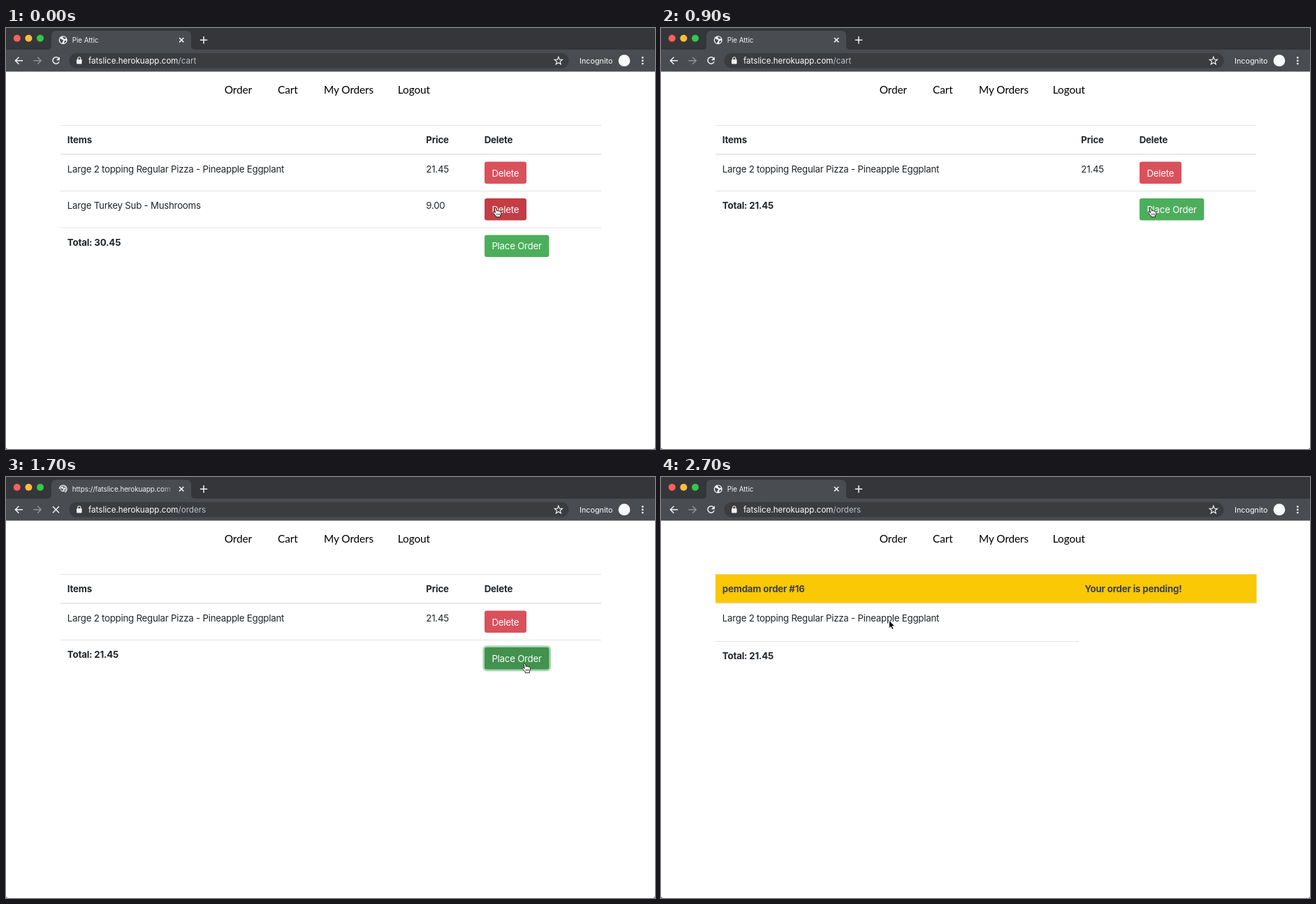
These frames come from a looping animation (929x603 px, 2.8 s). An HTML page:

```html
<!DOCTYPE html>
<html lang="en">
<head>
<meta charset="utf-8">
<title>Cart checkout</title>
<style>
  html, body { margin: 0; width: 100%; height: 100%; overflow: hidden; background: #fff; }
  svg { display: block; width: 929px; height: 603px; }
  text { font-family: Inter, Roboto, sans-serif; white-space: pre; }
  .page text { font-size: 13.27px; letter-spacing: -.018em; fill: #212529; }
  .page .bold { font-weight: 700; letter-spacing: -.013em; }
  .page .label { fill: #fff; }
  .page .banner { fill: #3f4045; }
  .nav text { font: 15.4px Lato, "Open Sans", sans-serif; letter-spacing: -.1px; fill: #000; }
  .title { font-size: 9.95px; letter-spacing: -.01em; fill: #f1f3f4; }
  .url { font-size: 11.6px; fill: #fff; }
  .path { fill: #bdc1c6; }
  .rule { stroke: #e0e3e6; stroke-width: 1; }
  .icon { fill: none; stroke: #f1f3f4; stroke-width: 1.5; }
  .hidden { display: none; }
</style>
</head>
<body>
<svg viewBox="0 0 929 603">
  <defs>
    <linearGradient id="fade">
      <stop offset="0" stop-color="#494c50" stop-opacity="0"/>
      <stop offset="1" stop-color="#494c50"/>
    </linearGradient>
    <g id="globe">
      <circle r="6" fill="#f1f3f4"/>
      <path d="M-4.7-1.8C-3-2.2-2.6-.6-.9-.5C.5-.3.8 1-.3 1.7C-1.3 2.4-.8 3.8-1.8 4.6C-3.7 3.8-4.9 1.6-4.7-1.8Z
               M-.6-4.7C1.5-5.2 3.6-4 4.4-2.2C3.3-1.3 2.4-2.2 1.6-1.4C.4-1.7 1.2-2.8.1-3.2Z
               M2.2 1.2C3.2.6 4.2.9 4.7 1.3C4.2 2.9 3.2 4 1.9 4.5C1.5 3.3 1.5 2 2.2 1.2Z" fill="#494c50"/>
    </g>
  </defs>

  <rect width="929" height="603" fill="#fff"/>

  <!-- Browser frame -->
  <rect width="929" height="32" fill="#35363a"/>
  <rect y="31" width="929" height="31.5" fill="#494c50"/>
  <path d="M58 31.5Q65 31.5 65 24.5V11Q65 4 72 4H258Q265 4 265 11V24.5Q265 31.5 272 31.5Z" fill="#494c50"/>
  <circle cx="15.8" cy="14.8" r="5" fill="#fc605c"/>
  <circle cx="32.4" cy="14.8" r="5" fill="#fdbc40"/>
  <circle cx="49" cy="14.8" r="5" fill="#34c749"/>
  <g id="idleIcon"><use href="#globe" x="81.7" y="17.2"/></g>
  <g id="busyIcon" transform="translate(81.7 17.2)">
    <use href="#globe" transform="scale(.62)"/>
    <path id="spinner" d="M0-5.3A5.3 5.3 0 1 1-4.6 2.65" fill="none" stroke="#e8eaed" stroke-width="1.4"/>
  </g>
  <text id="title" class="title" x="94.7" y="20.8"></text>
  <rect x="224" y="10" width="17" height="14" fill="url(#fade)"/>
  <path class="icon" d="M248 14l6.4 6.4M254.4 14l-6.4 6.4M283 12v10.4M277.8 17.2h10.4"/>

  <path class="icon" d="M24 46.7H13.6M18.4 41.7L13.4 46.7L18.4 51.7"/>
  <path class="icon" style="stroke:#8f9296" d="M39.5 46.7H50M45.2 41.7L50.2 46.7L45.2 51.7"/>
  <g id="reload">
    <path class="icon" d="M75.3 43.4A4.7 4.7 0 1 0 76 48.3"/>
    <path d="M76.9 41.2V46.2H71.9Z" fill="#f1f3f4"/>
  </g>
  <path id="stop" class="icon" d="M67 42.3l9 9M76 42.3l-9 9"/>
  <rect x="90.5" y="36" width="715" height="21.6" rx="10.8" fill="#3a3c40"/>
  <rect x="101" y="45" width="7.6" height="6.4" rx=".8" fill="#f1f3f4"/>
  <path d="M102.7 45.5V43.8A2.1 2.1 0 0 1 106.9 43.8V45.5" class="icon" style="stroke-width:1.1"/>
  <text class="url" x="118" y="50.7">fatslice.herokuapp.com<tspan id="path" class="path"></tspan></text>
  <path id="star" class="icon" style="stroke-width:1.1"/>
  <text class="url" style="font-size:10.8px" x="821" y="50.7">Incognito</text>
  <circle cx="885" cy="46.7" r="8.4" fill="#f8f9fa"/>
  <g fill="#f1f3f4">
    <circle cx="911.3" cy="42.5" r="1.4"/><circle cx="911.3" cy="46.8" r="1.4"/><circle cx="911.3" cy="51.1" r="1.4"/>
  </g>

  <g class="nav">
    <text x="312.8" y="94.4">Order</text>
    <text x="389" y="94.4">Cart</text>
    <text x="455" y="94.4">My Orders</text>
    <text x="560.8" y="94.4">Logout</text>
  </g>

  <!-- Cart -->
  <g id="cart" class="page">
    <path class="rule" d="M78 139.5H852M78 233.5H852"/>
    <path class="rule" style="stroke-width:1.6" d="M78 180.7H852"/>
    <text class="bold" x="87.8" y="164.8">Items</text>
    <text class="bold" x="601.3" y="164.8">Price</text>
    <text class="bold" x="684.7" y="164.8">Delete</text>
    <text x="87.8" y="206.7">Large 2 topping Regular Pizza - Pineapple Eggplant</text>
    <text x="601.3" y="206.7">21.45</text>
    <rect x="685" y="191.6" width="60" height="31.5" rx="3.3" fill="#d9515b"/>
    <text class="label" x="695.4" y="212.6">Delete</text>
    <g id="sub">
      <path class="rule" d="M78 286H852"/>
      <text x="87.8" y="259.2">Large Turkey Sub - Mushrooms</text>
      <text x="601.3" y="259.2">9.00</text>
      <rect id="redRing" x="682.4" y="241.5" width="65.2" height="36.7" rx="5.6" fill="#edaab0"/>
      <rect x="685" y="244.1" width="60" height="31.5" rx="3.3" fill="#c43c44"/>
      <text class="label" x="695.4" y="265">Delete</text>
    </g>
    <g id="foot">
      <text id="total" class="bold" x="87.8" y="259.2"></text>
      <rect id="greenRing" x="682.4" y="241.5" width="97.6" height="36.7" rx="5.6" fill="#a6d8b0"/>
      <rect id="place" x="685" y="244.1" width="92.4" height="31.5" rx="3.3"/>
      <text class="label" x="695.4" y="265">Place Order</text>
    </g>
  </g>

  <!-- Orders -->
  <g id="orders" class="page">
    <rect x="78" y="139" width="774.5" height="42" fill="#fac805"/>
    <path d="M78 139.5H852.5" stroke="#ead58a"/>
    <path d="M78 180.5H852.5" stroke="#e6d596" stroke-width="1.4"/>
    <path class="rule" d="M78 235.5H598"/>
    <text class="bold banner" x="87.8" y="164.8">pemdam order #16</text>
    <text class="bold banner" x="606.4" y="164.8">Your order is pending!</text>
    <text x="87.8" y="206.7">Large 2 topping Regular Pizza - Pineapple Eggplant</text>
    <text class="bold" x="87.8" y="260.8">Total: 21.45</text>
  </g>

  <path d="M0 600Q0 603 3 603H0ZM929 600Q929 603 926 603H929Z" fill="#55585c"/>

  <!-- Pointers, with the hot spot at 0,0 -->
  <g id="hand" stroke="#222" stroke-width="1" stroke-linejoin="round">
    <path fill="#fff" d="M-1.2.8C-1.3-.5.8-.6 1.1.6L2 4.2C2.4 3.2 4 3.3 4.2 4.4C4.8 3.6 6.1 3.9 6.2 4.9C6.9 4.4 8 4.8 8 5.8
      C8.2 8 8.1 9.2 7 10.9V12.7H.8V11.4C-.8 9.8-1.6 8.2-3.2 6.8C-4 5.6-2.6 4.8-1.6 5.6L-.2 6.7Z"/>
    <path fill="none" stroke-width=".8" d="M2.1 7.6V10.4M4.1 7.6V10.4M6 7.6V10.4"/>
  </g>
  <path id="arrow" d="M0 0V11.3L2.6 8.9L4.3 12.8L6.3 11.9L4.6 8.1H8.2Z" fill="#000" stroke="#fff" stroke-width=".8"/>
</svg>

<script>
const LOOP = 2800, STEP = 100;
const $ = id => document.getElementById(id);
const show = (id, on) => $(id).classList.toggle("hidden", !on);

// Pointer stops: time, x, y
const moves = [
  [0, 700.6, 258], [1000, 705, 261], [1100, 718, 269], [1200, 734, 273],
  [1300, 743, 274.5], [1400, 742.6, 269], [1500, 742.4, 267.6],
  [2600, 596, 243], [2700, 326.5, 205.5]
];

// Value of the latest entry reached in a [time, ...] list
const at = (list, t) => list.filter(e => e[0] <= t).pop();

const redGlow = [[0, 0], [200, .5], [300, 1]];
const greenGlow = [[0, 0], [1600, .5], [1700, 1]];
const placeFill = [[0, "#4cae5c"], [1000, "#499f56"], [1100, "#43914e"]];

function draw(ms) {
  const t = Math.floor(ms / STEP) * STEP;
  const twoItems = t < 600, ordered = t >= 2100, leaving = t >= 1700;
  const busy = t >= 300 && twoItems || leaving && !ordered;

  show("cart", !ordered);
  show("orders", ordered);
  show("sub", twoItems);
  show("idleIcon", !busy);
  show("busyIcon", busy);
  show("reload", !busy);
  show("stop", busy);

  $("title").textContent = leaving && !ordered ? "https://fatslice.herokuapp.com" : "Pie Attic";
  $("path").textContent = leaving ? "/orders" : "/cart";
  $("total").textContent = twoItems ? "Total: 30.45" : "Total: 21.45";
  $("foot").setAttribute("transform", `translate(0 ${twoItems ? 52.4 : 0})`);
  $("spinner").setAttribute("transform", `rotate(${-t * .9})`);
  $("redRing").setAttribute("opacity", at(redGlow, t)[1]);
  $("greenRing").setAttribute("opacity", at(greenGlow, t)[1]);
  $("place").setAttribute("fill", at(placeFill, t)[1]);

  const [, x, y] = at(moves, t), pointing = t < 2600;
  show("hand", pointing);
  show("arrow", !pointing);
  $(pointing ? "hand" : "arrow").setAttribute("transform", `translate(${x} ${y})`);
}

const starPoints = Array.from({ length: 10 }, (_, i) => {
  const r = i % 2 ? 2.5 : 6, a = i * Math.PI / 5;
  return `${790.8 + r * Math.sin(a)} ${47.2 - r * Math.cos(a)}`;
});
$("star").setAttribute("d", `M${starPoints.join("L")}Z`);

const start = performance.now();
function tick() {
  draw((performance.now() - start) % LOOP);
  requestAnimationFrame(tick);
}
tick();
</script>
</body>
</html>
```
